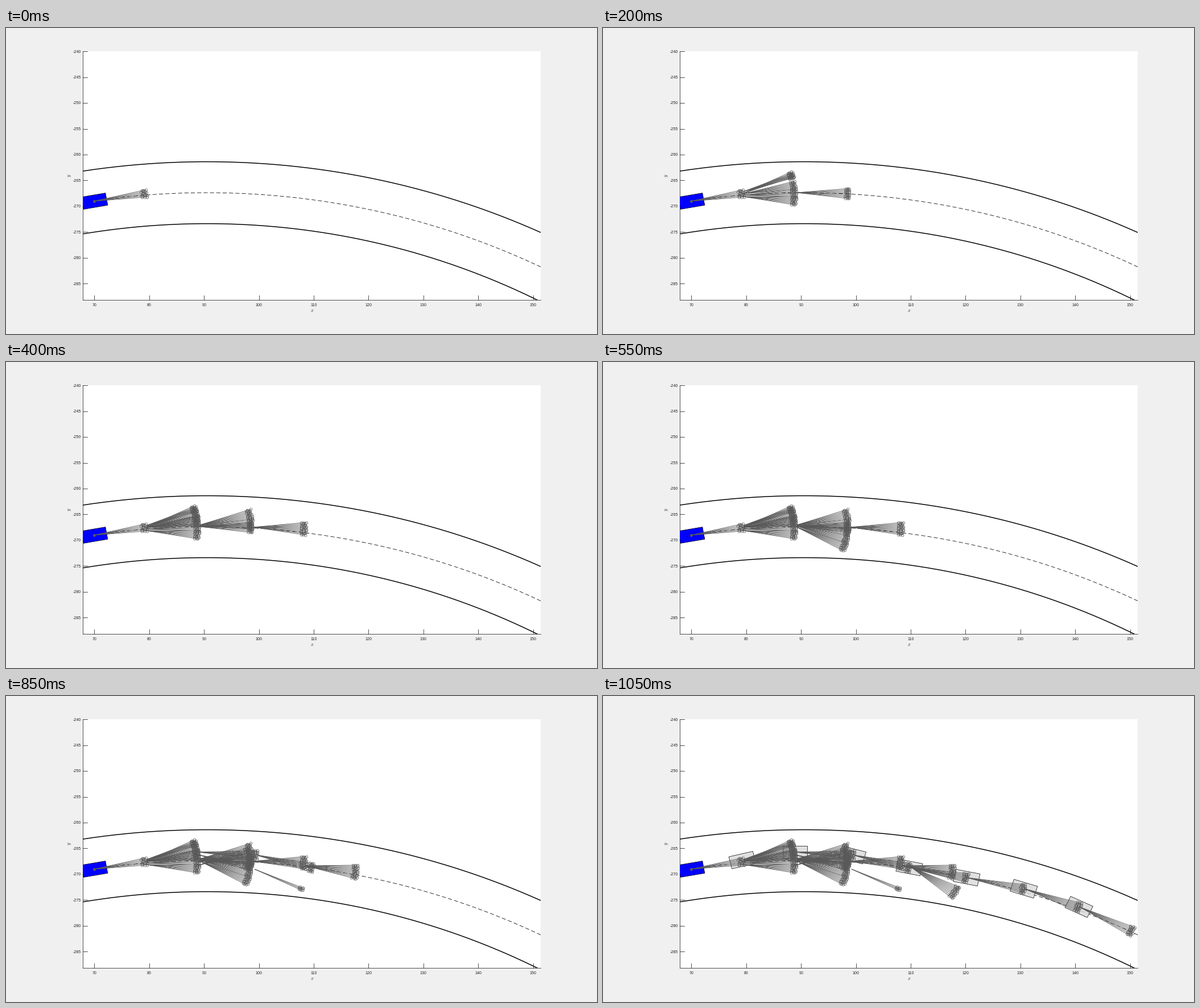
Recreate the animation shown at these times as a matplotlib script. Size 1039 by 539 pixels, loop 1.1 s.

```python
import matplotlib.pyplot as plt
import numpy as np
from matplotlib.animation import FuncAnimation
from matplotlib.collections import LineCollection
from matplotlib.patches import Polygon, Rectangle

W, H, DPI = 1039, 539, 128
PX = 72 / DPI                 # one pixel in points
SX, SY = 9.64, 9.09           # pixels per data unit
LEFT, RIGHT, TOP, BOTTOM = 135.4, 940.3, 40.6, 479.4
FRAMES, STEP_MS = 22, 50
GRAY, INK = "#595959", "#262626"
REACH, PATH_REACH = 88, 99    # length of a search ray, of a chosen one

plt.rcParams["mathtext.fontset"] = "cm"
fig = plt.figure(figsize=(W / DPI, H / DPI), dpi=DPI, facecolor="#f0f0f0")
ax = fig.add_axes([0, 0, 1, 1])
ax.set_xlim(0, W)
ax.set_ylim(H, 0)
ax.axis("off")
rng = np.random.default_rng(4)

plot_area = Rectangle((LEFT, TOP), RIGHT - LEFT, BOTTOM - TOP, fc="white", ec="none", zorder=0)
ax.add_patch(plot_area)


def line(x, y, color=INK, width=0.8, z=1, **kw):
    return ax.plot(x, y, color=color, lw=width * PX, zorder=z, **kw)[0]


def draw_axes():
    line([LEFT, LEFT], [TOP, BOTTOM])
    line([LEFT, RIGHT], [BOTTOM, BOTTOM])
    font = dict(family="Liberation Sans", size=7.1 * PX, color=INK)
    for i in range(9):
        x = 155.4 + 10 * SX * i
        line([x, x], [BOTTOM, BOTTOM - 8])
        ax.text(x, 488, str(70 + 10 * i), ha="center", va="center", **font)
    for i in range(10):
        y = 41.2 + 5 * SY * i
        line([LEFT, LEFT + 8], [y, y])
        ax.text(132.3, y + 0.8, str(-240 - 5 * i), ha="right", va="center", **font)
    ax.text(538, 497.5, "$x$", ha="center", va="center", size=8.5 * PX, color=INK)
    ax.text(112, 260, "$y$", ha="center", va="center", rotation=90, size=8.5 * PX, color=INK)


def draw_road():
    """Two edges and a centre line as concentric arcs, six units apart."""
    x = np.linspace(LEFT, RIGHT, 300)
    radius = 136
    for offset, width, style in [(-6, 1.5, {}), (6, 1.5, {}), (0, 0.8, dict(dashes=(9, 5)))]:
        height = np.sqrt((radius - offset) ** 2 - ((x - 353.3) / SX) ** 2)
        lane = line(x, 290.1 + SY * (radius - height), "black", width, 2, **style)
        lane.set_clip_path(plot_area)


def car(x, y, angle, z, **style):
    a = np.radians(angle)
    u = np.array([2.25, 2.25, -2.25, -2.25])
    v = np.array([1.2, -1.2, -1.2, 1.2])
    px = x + SX * (u * np.cos(a) - v * np.sin(a))
    py = y - SY * (u * np.sin(a) + v * np.cos(a))
    patch = Polygon(np.c_[px, py], ec="black", lw=0.7 * PX, zorder=z, **style)
    ax.add_patch(patch)
    patch.set_clip_path(plot_area)
    return patch


def fan(ox, oy, y0, y1, reach=REACH):
    """Rays from one node to tips between two heights, three speeds per ray."""
    rays = 2 + int(abs(y1 - y0) / 2.5)
    angle = np.repeat(np.arcsin((np.linspace(y0, y1, rays) - oy) / reach), 3)
    r = reach + np.tile([-3.0, 0.5, 4.0], rays) + rng.uniform(-1.2, 1.2, 3 * rays)
    x, y = ox + r * np.cos(angle), oy + r * np.sin(angle)
    lines = LineCollection([[(ox, oy), tip] for tip in zip(x[2::3], y[2::3])],
                           colors=GRAY, linewidths=0.9 * PX, zorder=5)
    ax.add_collection(lines)
    tips = ax.plot(x, y, "o", ms=4.6 * PX, mfc="none", mec=GRAY,
                   mew=0.7 * PX, zorder=5)[0]
    return [lines, tips]


# first and last step, node x, node y and tip y ranges swept over those steps
SWEEPS = [
    (0, 0, 155, (305, 305), (286, 298)),
    (1, 3, 247, (292, 297), (271, 311)),
    (3, 3, 247, (291, 291), (255, 264)),
    (4, 7, 247, (288, 292), (257, 288)),
    (4, 4, 341, (290, 290), (283, 300)),
    (6, 7, 341, (287, 288), (261, 294)),
    (8, 8, 435, (291, 291), (283, 304)),
    (9, 11, 341, (291, 287), (331, 292)),
    (12, 15, 339, (298, 280), (268, 306)),
    (14, 14, 526, (299, 299), (298, 321)),
    (17, 17, 437, (305, 305), (337, 341)),
    (18, 18, 541, (301, 301), (335, 354)),
]

# Chosen path: centre and heading of each car
POSES = [(245, 289, 13.5), (337.5, 275, 0), (438.5, 280, -15), (538.5, 302, -11.5),
         (639.3, 320, -11.5), (739.7, 339.5, -17.5), (836.7, 371.5, -25.5)]
GOAL_Y = 413.5
PATH_STEPS = [16, 17, 19, 20, 20, 21]

draw_axes()
draw_road()
car(155.5, 305, 10.2, 3, fc="blue")
ax.plot(155.3, 304.8, "o", ms=5 * PX, color=GRAY, mew=0, zorder=6)

steps = [[] for _ in range(FRAMES)]
for first, last, ox, nodes, band in SWEEPS:
    count = last - first + 1
    node_y = np.linspace(*nodes, count)
    edges = np.linspace(*band, count + 1)
    for i in range(count):
        steps[first + i] += fan(ox, node_y[i], edges[i], edges[i + 1])

goals = [pose[1] for pose in POSES[2:]] + [GOAL_Y]
for step, (x, y, _), goal in zip(PATH_STEPS, POSES[1:], goals):
    steps[step] += fan(x + 1, y, goal - 7.5, goal + 7, PATH_REACH)
steps[-1] += [car(*pose, 4, fc=(0.85, 0.85, 0.85, 0.8)) for pose in POSES]


def update(frame):
    for i, group in enumerate(steps):
        for artist in group:
            artist.set_visible(i <= frame)
    return []


anim = FuncAnimation(fig, update, frames=FRAMES, init_func=lambda: update(0),
                     interval=STEP_MS, repeat=True, repeat_delay=0, blit=False)
plt.show()
```
